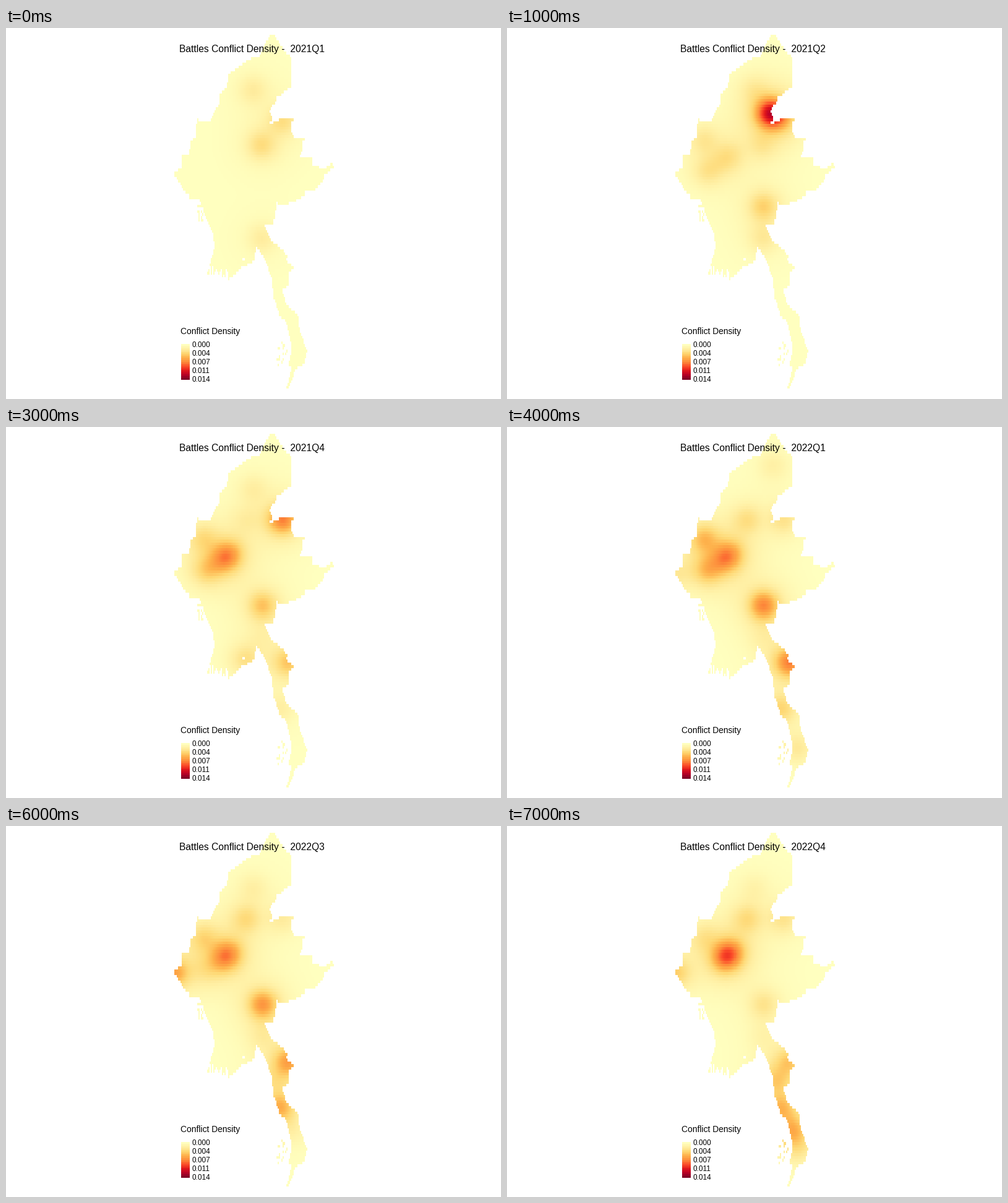
These frames come from a looping animation (800 by 600 pixels, 8 s). A matplotlib script:

```python
import matplotlib.pyplot as plt
import numpy as np
from matplotlib.animation import FuncAnimation
from matplotlib.colors import LinearSegmentedColormap
from matplotlib.path import Path

W, H, DPI = 800, 600, 100
GRID = 128
LEFT, RIGHT, TOP, BOTTOM = 270, 530, 11.3, 588
VMAX = 14.2  # thousandths

plt.rcParams["font.family"] = "Liberation Sans"
heat = LinearSegmentedColormap.from_list("heat", [
    "#ffffbf", "#ffeda0", "#fed976", "#feb24c", "#fd8d3c",
    "#fc4e2a", "#e31a1c", "#bd0026", "#800026"])

# Key points of the border, clockwise from the northern tip
east = [
    (427, 11), (433, 11), (448, 35), (461, 48), (460, 96), (449, 102),
    (445, 109), (437, 112), (435, 121), (425, 134), (433, 147), (426, 151),
    (426, 156), (433, 155), (434, 151), (441, 151), (441, 146), (465, 146),
    (465, 151), (460, 152), (460, 165), (465, 178), (483, 179), (479, 187),
    (479, 197), (474, 209), (495, 210), (495, 222), (514, 228), (527, 219),
    (530, 225), (514, 239), (511, 250), (498, 263), (484, 264), (482, 273),
    (470, 277), (468, 282), (441, 287), (437, 282), (435, 300), (432, 317),
    (418, 319), (430, 345), (446, 358), (454, 369), (453, 378), (465, 385),
    (465, 390), (457, 395), (457, 415), (446, 425), (454, 448), (473, 465),
    (473, 483), (487, 523), (482, 543), (468, 552), (457, 583), (453, 584)]
west = [
    (462, 551), (457, 545), (462, 515), (453, 476), (441, 464), (433, 437),
    (430, 404), (417, 371), (405, 353), (401, 377), (379, 388), (361, 407),
    (345, 400), (325, 399), (337, 354), (335, 335), (326, 313), (313, 281),
    (308, 275), (294, 275), (285, 257), (270, 236), (284, 226), (284, 207),
    (297, 206), (298, 182), (306, 178), (308, 147), (315, 152), (330, 152),
    (346, 118), (344, 109), (358, 95), (359, 75), (392, 51), (409, 46)]

places = dict(
    far_north=(430, 62), north=(399, 100), hills=(388, 150),
    gap=(427, 138), gate=(447, 150), plateau=(413, 190),
    core_a=(361, 204), core_b=(352, 216), chin=(318, 181),
    valley=(324, 232), bay=(272, 238), kayah=(415, 289),
    gulf=(414, 340), delta=(387, 376), pass_=(456, 381),
    shore_a=(434, 412), shore_b=(442, 456), shore_c=(461, 492),
    shore_d=(469, 520))

# Strength of each place in thousandths
strengths = {
    "2021Q1": dict(north=1.8, plateau=3, gate=2.8, gulf=1.8),
    "2021Q2": dict(gap=11.6, gate=1.8, north=1.4, plateau=1.6, core_a=1.4,
                   core_b=1.4, chin=2, valley=2.2, kayah=3.8, gulf=1.9),
    "2021Q4": dict(gate=7.4, north=1.4, hills=1.1, core_a=3.9, core_b=3.8,
                   chin=2.6, valley=3.1, kayah=4.5, gulf=.7, delta=2.6,
                   pass_=4.3, shore_b=1.5),
    "2022Q1": dict(far_north=1.4, hills=2.6, gate=2.5, core_a=3.7,
                   core_b=3.7, chin=4.2, valley=3.9, bay=1.7, kayah=7.2,
                   gulf=.8, pass_=7.4, shore_b=3.5, shore_d=2),
    "2022Q3": dict(north=1.3, hills=2.9, gate=1.7, core_a=3.9, core_b=4,
                   chin=2.8, valley=1.5, bay=5.8, kayah=6.5, gulf=1.2,
                   pass_=5.8, shore_a=1.6, shore_b=5.2, shore_c=1),
    "2022Q4": dict(north=1, hills=2.8, gate=2.4, core_a=5.2, core_b=5,
                   chin=1.9, bay=3.9, kayah=2.5, gulf=.8, pass_=3.8,
                   shore_a=3.2, shore_b=4.2, shore_c=4.6, shore_d=2)}

dx, dy = (RIGHT - LEFT) / GRID, (BOTTOM - TOP) / GRID
X, Y = np.meshgrid(LEFT + dx * (np.arange(GRID) + .5),
                   TOP + dy * (np.arange(GRID) + .5))


def box(x0, x1, y0, y1):
    return (X > x0) & (X < x1) & (Y > y0) & (Y < y1)


def land_mask():
    rng = np.random.default_rng(5)
    cells = np.column_stack([X.ravel(), Y.ravel()])
    land = Path(east + west).contains_points(cells).reshape(X.shape)
    land &= ~box(382, 386, 371.5, 376.5)
    # Inlets: each column of the coast ends at a random height
    for x0, x1, y0, y1 in [(325, 362, 384, 412), (284, 297, 260, 282)]:
        land &= ~(box(x0, x1, y0, H) & (Y > rng.uniform(y0, y1, GRID)))
    # Islands: random cells off the coast
    for area, share in [(box(308, 320, 286, 312), .5),
                        (box(437, 455, 502, 546), .15)]:
        land |= area & (rng.random(X.shape) < share)
    return land


def spot(x, y):
    """A narrow peak on a wide halo."""
    r2 = (X - x) ** 2 + (Y - y) ** 2
    return .8 * np.exp(-r2 / (2 * 16.5 ** 2)) + .2 * np.exp(-r2 / (2 * 36 ** 2))


def density(quarter):
    return sum(s * spot(*places[p]) for p, s in strengths[quarter].items())


quarters = [f"{year}Q{q}" for year in (2021, 2022) for q in (1, 2, 3, 4)]
fields = {q: density(q) for q in strengths}
# A quarter without strengths lies halfway between its neighbours
for before, q, after in zip(quarters, quarters[1:], quarters[2:]):
    if q not in strengths:
        fields[q] = (fields[before] + fields[after]) / 2
sea = ~land_mask()

fig = plt.figure(figsize=(W / DPI, H / DPI), dpi=DPI, facecolor="white")
ax = fig.add_axes([0, 0, 1, 1])
ax.axis("off")


def label(x, y, text, px):
    return ax.text(x, y, text, fontsize=px * 72 / DPI, color="black",
                   ha="left", va="baseline")


def raster(values, left, right, top, bottom):
    return ax.imshow(values, cmap=heat, vmin=0, vmax=VMAX, aspect="auto",
                     interpolation="nearest",
                     extent=(left, right, bottom, top))


country = raster(np.ma.array(fields[quarters[0]], mask=sea),
                 LEFT, RIGHT, TOP, BOTTOM)
raster(np.linspace(0, VMAX, 20)[:, None], 283, 297, 511, 569)
ax.set_xlim(0, W)
ax.set_ylim(H, 0)

title = label(279.5, 39, "", 15.6)
label(281.8, 495, "Conflict Density", 13.8)
for i, text in enumerate(["0.000", "0.004", "0.007", "0.011", "0.014"]):
    label(300.6, 516 + 14 * i, text, 11.7)


def draw(i):
    quarter = quarters[i]
    country.set_data(np.ma.array(fields[quarter], mask=sea))
    title.set_text(f"Battles Conflict Density -  {quarter}")
    return country, title


anim = FuncAnimation(fig, draw, frames=len(quarters), interval=1000,
                     repeat=True, repeat_delay=0)
plt.show()
```
